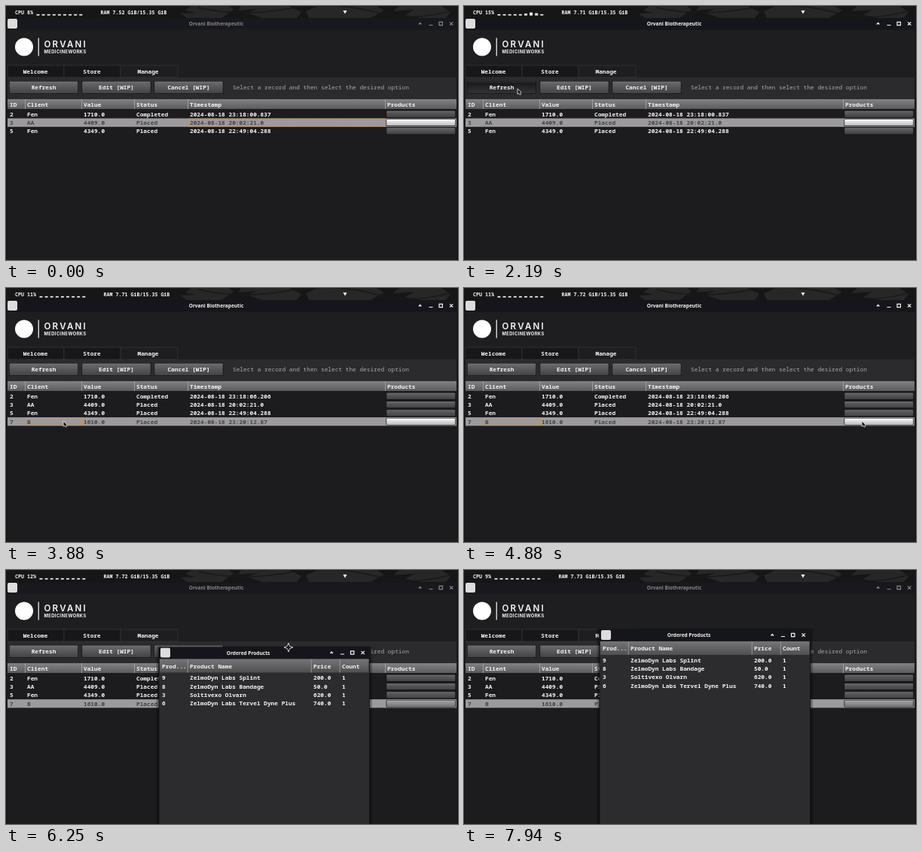
Recreate the animation shown at these times as an HTML page. Size 600 px wide and 338 px high, loop 8000 ms.

```html
<!DOCTYPE html>
<html lang="en">
<head>
<meta charset="utf-8">
<title>Order manager</title>
<style>
  html, body { margin: 0; width: 100%; height: 100%; overflow: hidden; background: #1e1d20; }
  svg { display: block; width: 100vw; height: 100vh; }
  text { font: 600 7.8px "Noto Sans Mono", "DejaVu Sans Mono", monospace; fill: #f6f6f6; white-space: pre; }
  .bar { font-size: 6.67px; font-weight: 700; }
  .title { font: 700 6.55px "Noto Sans", "Open Sans", sans-serif; }
  .brand { font: 600 11.6px Inter, "Open Sans", sans-serif; letter-spacing: 2.2px; }
  .sub { font: 700 5.8px Inter, "Open Sans", sans-serif; letter-spacing: .42px; }
</style>
</head>
<body>
<svg id="stage" viewBox="0 0 600 338">
  <defs>
    <linearGradient id="button" x2="0" y2="1"><stop stop-color="#6a696b"/><stop offset="1" stop-color="#434244"/></linearGradient>
    <linearGradient id="hover" x2="0" y2="1"><stop stop-color="#171618"/><stop offset="1" stop-color="#343336"/></linearGradient>
    <linearGradient id="header" x2="0" y2="1"><stop stop-color="#828183"/><stop offset="1" stop-color="#5a595b"/></linearGradient>
    <linearGradient id="popupHeader" x2="0" y2="1"><stop stop-color="#767577"/><stop offset="1" stop-color="#4f4e50"/></linearGradient>
    <linearGradient id="cell" x2="0" y2="1"><stop stop-color="#626164"/><stop offset="1" stop-color="#414043"/></linearGradient>
    <linearGradient id="picked" x2="0" y2="1"><stop stop-color="#a4a3a5"/><stop offset="1" stop-color="#747375"/></linearGradient>
    <linearGradient id="bright" x2="0" y2="1"><stop stop-color="#fafafa"/><stop offset="1" stop-color="#b9b8ba"/></linearGradient>
    <clipPath id="topbar"><path d="M0 0H600V16H0Z"/></clipPath>
  </defs>
  <g id="scene"></g>
</svg>
<script>
const LOOP = 8000, STEP = 62.5, PITCH = 11.3;
const REFRESHED = 2250, FOCUSED = 1937, PICKED = 3500, OPENED = 5000;

// time, x, y
const POINTER = [
  [310, 535, 334], [1060, 231, 184], [1880, 71, 110], [2500, 71, 110],
  [2900, 276, 112], [3310, 79, 171], [3375, 79, 171], [3875, 76, 177],
  [4125, 76, 177], [4875, 528, 177], [5375, 528, 177], [5750, 488, 68],
  [6060, 488, 68], [6125, 455, 80], [6187, 405, 95], [6250, 375, 103],
  [6375, 364, 96], [6625, 357, 85], [6750, 357, 84], [7070, 357, 84],
  [7560, 482, 131], [7880, 470, -12]
];
const POPUP = [
  [6060, 314, 72], [6125, 286, 81], [6187, 240, 98], [6250, 203, 110],
  [6375, 189, 100], [6625, 180, 87.5], [6750, 180, 86.5]
];
// time, CPU load, RAM in use
const LOAD = [
  [0, 8, "7.52"], [560, 10, "7.61"], [1560, 15, "7.71"], [2560, 11, "7.71"],
  [4560, 11, "7.72"], [5560, 12, "7.72"], [7500, 9, "7.73"]
];
const COLUMNS = [[5, "ID"], [28, "Client"], [103, "Value"], [173, "Status"], [244, "Timestamp"], [506, "Products"]];
const PRODUCTS = [
  ["9", "ZelmoDyn Labs Splint", "200.0", "1"],
  ["8", "ZelmoDyn Labs Bandage", "50.0", "1"],
  ["3", "Soltivexo Olvarn", "620.0", "1"],
  ["6", "ZelmoDyn Labs Tervel Dyne Plus", "740.0", "1"]
];

const rect = (x, y, w, h, fill, more = "") =>
  `<rect x="${x}" y="${y}" width="${w}" height="${h}" fill="${fill}" ${more}/>`;
const path = (d, more = "") => `<path d="${d}" ${more}/>`;
const text = (x, y, label, more = "") => `<text x="${x}" y="${y}" ${more}>${label}</text>`;
const centred = 'text-anchor="middle"';
const line = color => `fill="none" stroke="${color}"`;

// Raised control: dark frame, gradient face, light top edge.
const raised = (x, y, w, h, look, edge) =>
  rect(x, y, w, h, "#121113", 'rx="1.6"') +
  rect(x + .7, y + .7, w - 1.4, h - 1.4, `url(#${look})`, 'rx="1"') +
  rect(x + 1.2, y + .7, w - 2.4, .7, edge);

function track(points, t) {
  const next = points.findIndex(p => p[0] > t);
  if (next === 0) return points[0].slice(1);
  if (next < 0) return points[points.length - 1].slice(1);
  const [a, b] = [points[next - 1], points[next]];
  let u = (t - a[0]) / (b[0] - a[0]);
  if (b[0] - a[0] > 200) u = u * u * (3 - 2 * u);
  return [a[1] + (b[1] - a[1]) * u, a[2] + (b[2] - a[2]) * u];
}

function topBar(t) {
  const [, load, ram] = LOAD.filter(row => row[0] <= t).pop();
  const shift = load > 9 ? 4 : 0;
  let bars = "";
  for (let i = 0; i < 9; i++) {
    const h = load === 15 && i > 4 && i < 8 ? [2.5, 4, 3][i - 5] : 1.7;
    bars += rect(40.5 + shift + i * 7.1, 12.6 - h, 4, h, "#eee");
  }
  const branches =
    path("M214 0H246L238 6 252 9 232 10 240 16H214Z M286 16L302 5 296 0H312L308 6 334 4 320 9 340 16Z M376 0L392 8 386 16H402L398 7 414 0Z M484 16L502 6 492 0H522L514 7 542 5 530 12 552 16Z M578 0L590 8 584 16H600V0Z", 'fill="#161617"') +
    path("M255 2Q310 15 372 4T490 8T600 3", line("#19191a") + ' stroke-width="1.6"');
  return rect(0, 0, 600, 17, "#161617") +
    `<g clip-path="url(#topbar)">${rect(214, 0, 386, 16, "#272728")}${branches}</g>` +
    text(12, 11, `CPU ${load}%`, 'class="bar"') + bars +
    text(125.5 + shift, 11, `RAM ${ram} GiB/15.35 GiB`, 'class="bar"') +
    path("M447.5 6H452.5L450 10.5Z", 'fill="#fff"');
}

function titleBar(x, y, w, middle, label, active) {
  const ink = active ? "#f5f5f5" : "#85868a";
  const right = x + w;
  return rect(x, y - 7, w, 15, active ? "#15161b" : "#18191e") +
    rect(x + 2, y - 6.5, 13, 13, "#dddcdd", 'rx="2"') +
    text(middle, y + 2.8, label, `class="title" ${centred} style="fill:${ink}"`) +
    path(`M${right - 52} ${y + 1}l1.7-2 1.7 2M${right - 38.5} ${y + 2}h5M${right - 25} ${y - 2.2}h4.4v4.4h-4.4ZM${right - 11} ${y - 2.2}l4.4 4.4m0-4.4l-4.4 4.4`,
      line(ink) + ' stroke-width="1.2"');
}

function toolbar(px, py) {
  const button = (x, label) => {
    const over = px >= x && px <= x + 91 && py >= 100 && py <= 117;
    return raised(x, 100, 92, 17, over ? "hover" : "button", over ? "#4a494c" : "#838284") +
      text(x + 46, 111, label, centred);
  };
  return button(4, "Refresh") + button(100.5, "Edit [WIP]") + button(196.5, "Cancel [WIP]") +
    text(301, 111, "Select a record and then select the desired option", 'style="fill:#aaa9ab;font-weight:400"');
}

function banner() {
  const tabs = [["Welcome", 39], ["Store", 114], ["Manage", 188.5]].map(([label, x], i) =>
    rect(2 + i * 75, 79, i === 2 ? 76 : 75, 16, i === 2 ? "#1e1d20" : "#171619", 'stroke="#39383b" stroke-width=".7"') +
    text(x, 89.8, label, centred)).join("");
  return `<circle cx="24" cy="54.5" r="12" fill="#fff"/>` + rect(42.6, 42.5, 1.3, 24, "#e8e8e8") +
    text(50.5, 55, "ORVANI", 'class="brand"') + text(50.5, 63.2, "MEDICINEWORKS", 'class="sub"') +
    rect(2, 95, 596, 29, "#2b2a2d") + tabs;
}

function orders(t, px, py) {
  const fresh = t >= REFRESHED;
  const rows = [
    ["2", "Fen", "1710.0", "Completed", fresh ? "2024-08-18 23:18:06.206" : "2024-08-18 23:18:00.837"],
    ["3", "AA", "4409.0", "Placed", "2024-08-18 20:02:21.0"],
    ["5", "Fen", "4349.0", "Placed", "2024-08-18 22:49:04.288"]
  ];
  if (fresh) rows.push(["7", "B", "1610.0", "Placed", "2024-08-18 23:20:12.87"]);
  const selected = !fresh ? 1 : t >= PICKED ? 3 : -1;

  let out = rect(2, 124, 596, 13.5, "url(#header)");
  if (py > 125 && py < 137 && px > 242 && px < 503) out += rect(242, 124.5, 261, 12.5, "#fff", 'opacity=".15"');
  for (const [x, label] of COLUMNS) {
    out += text(x, 133.5, label);
    if (x > 5) out += rect(x - 2.8, 124, .8, 13.5, "#a9a8aa");
  }
  out += rect(2, 137, 596, 201, "#1c1b1e");
  rows.forEach((row, i) => {
    const y = 138.2 + i * PITCH, on = i === selected;
    if (on) out += rect(2, y, 596, PITCH, "#9c9a9d");
    row.forEach((value, c) => {
      out += text(COLUMNS[c][0], y + 8.5, value, on ? 'style="fill:#424144"' : "");
    });
    const look = !on ? "cell" : t < OPENED ? "bright" : "picked";
    const edge = { cell: "#78777a", bright: "#fff", picked: "#b4b3b5" }[look];
    out += raised(504.5, y + .9, 92.5, 9.6, look, edge);
  });
  if (t < 125) {
    out += rect(241.7, 150, 262, 10.5, "none", `stroke="#d58a35" stroke-width=".9" stroke-dasharray="1.2 .8" opacity="${t < 60 ? 1 : .5}"`);
  }
  if (t >= PICKED && t < OPENED) {
    out += rect(25.7, 172.6, 75.5, 10, "none", 'stroke="#dd8d2e" stroke-width="1"');
  }
  return out;
}

function popup(t) {
  const [x, y] = track(POPUP, t);
  const columns = [[4, "Prod..."], [41, "Product Name"], [205, "Price"], [243, "Count"]];
  let out = "";
  for (let grow = 1; grow <= 4; grow++) {
    out += rect(-grow, -7 - grow / 2, 279.5 + 2 * grow, 270 + grow, "#000", 'rx="3" opacity=".13"');
  }
  out += rect(0, -7, 279.5, 268, "#2c2b2e") + titleBar(0, 0, 279.5, 118.5, "Ordered Products", true) +
    rect(1, 8.5, 277.5, 18, "url(#popupHeader)");
  columns.forEach(([cx, label], c) => {
    out += text(cx, 20.6, label);
    if (c) out += rect(cx - 3.2, 8.5, .8, 18, "#a09fa1");
    PRODUCTS.forEach((row, i) => out += text(cx, 36.3 + i * PITCH, row[c]));
  });
  out += rect(0, -7, 279.5, 268, "none", 'stroke="#131315" stroke-width=".8"');
  return `<g transform="translate(${x} ${y})">${out}</g>`;
}

function pointer(t, x, y) {
  if (t < 310 || t >= 7870) return "";
  const moving = t >= 6060 && t < 6900;
  const shape = moving
    ? "M0-6L1.6-1.6 6 0 1.6 1.6 0 6-1.6 1.6-6 0-1.6-1.6Z"
    : "M0 0V7.2L1.7 6 3.2 8.2 4.5 7.4 4.2 5.2 5 4.7Z";
  return path(shape, `transform="translate(${x} ${y})" fill="#171719" stroke="#f2f2f2" stroke-width=".8" stroke-linejoin="round"`);
}

function scene(t) {
  const [x, y] = track(POINTER, t);
  const active = t >= FOCUSED && t < OPENED;
  return rect(0, 0, 600, 338, "#1e1d20") + topBar(t) +
    titleBar(0, 23.5, 600, 279, "Orvani Biotherapeutic", active) +
    banner() + toolbar(x, y) + orders(t, x, y) +
    rect(0, 31, 1.2, 307, "#131317") + rect(598.8, 31, 1.2, 307, "#131317") +
    (t >= OPENED ? popup(t) : "") + pointer(t, x, y);
}

const stage = document.getElementById("scene");
const start = performance.now();
let shown = -1;
function tick() {
  const step = Math.floor((performance.now() - start) % LOOP / STEP);
  if (step !== shown) {
    shown = step;
    stage.innerHTML = scene(step * STEP);
  }
  requestAnimationFrame(tick);
}
tick();
</script>
</body>
</html>
```
